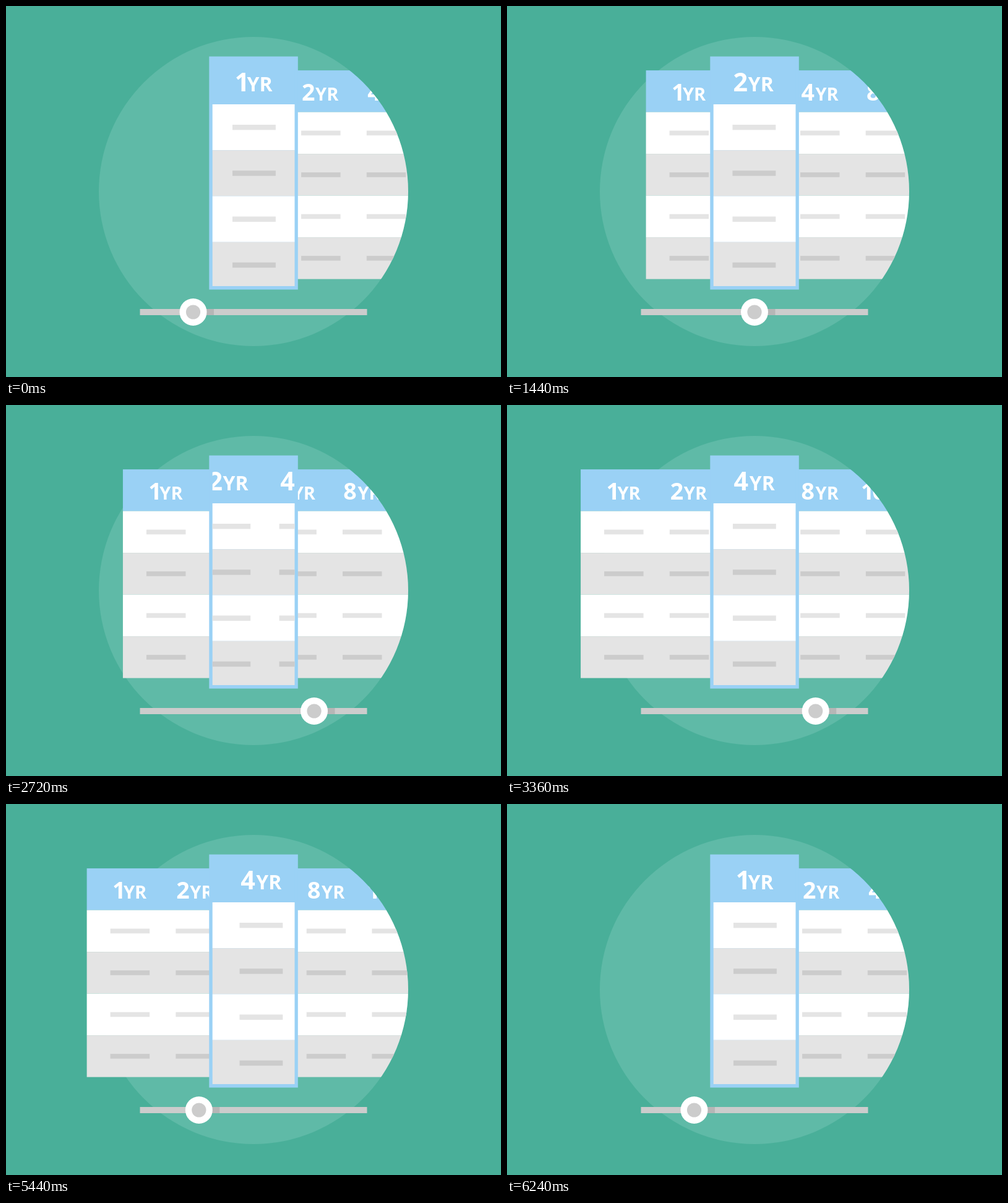
Recreate the animation shown at these times as an HTML page with a canvas. Size 800 by 600 pixels, loop 7680 ms.

```html
<!DOCTYPE html>
<html lang="en">
<head>
<meta charset="utf-8">
<title>Table with zoom slider</title>
<style>
  html, body { margin: 0; width: 100%; height: 100%; overflow: hidden; background: #49af99; }
  canvas { display: block; }
</style>
</head>
<body>
<canvas id="stage" width="800" height="600"></canvas>
<script>
const ctx = document.getElementById('stage').getContext('2d');
const LOOP = 7680;
const BLUE = '#9ad1f5', GREY = '#e4e4e4', DARK = '#ccc';
const COLUMN = 105.7, ROW = 67.5;

// label, x of the digits and x of "YR" inside the column
const LABELS = [['1', 41.4, 59.4], ['2', 39, 61], ['4', 39.5, 62.4], ['8', 39.3, 62.4], ['10', 30, 70]];

// resting positions for the three stops
const KNOB = [302.5, 400, 498.7];
const TABLE = [333.4, 224.6, 119.1];
const LENS = [324.2, 206.4, 90.6];

const MOVES = [
  { start: 0, from: 0, to: 1 },
  { start: 1920, from: 1, to: 2 },
  { start: 4800, from: 2, to: 0 }
];

// cubic-bezier(.73, 0, .03, 1)
function ease(x) {
  if (x <= 0) return 0;
  if (x >= 1) return 1;
  let low = 0, high = 1, s;
  for (let i = 0; i < 24; i++) {
    s = (low + high) / 2;
    const r = 1 - s;
    if (3 * r * r * s * 0.73 + 3 * r * s * s * 0.03 + s * s * s < x) low = s;
    else high = s;
  }
  return s * s * (3 - 2 * s);
}

function rect(color, x, y, w, h) {
  ctx.fillStyle = color;
  ctx.fillRect(x, y, w, h);
}

function disc(color, x, y, r) {
  ctx.fillStyle = color;
  ctx.beginPath();
  ctx.arc(x, y, r, 0, Math.PI * 2);
  ctx.fill();
}

function text(string, size, x, spacing) {
  ctx.font = `700 ${size}px "Open Sans", sans-serif`;
  ctx.letterSpacing = spacing + 'px';
  ctx.fillText(string, x, -19);
}

// The origin is the left end of the line under the header.
function drawTable() {
  rect(BLUE, 0, -ROW, 700, ROW);
  for (let row = 0; row < 4; row++) {
    const shaded = row % 2;
    rect(shaded ? GREY : '#fff', 0, row * ROW, 700, ROW);
    LABELS.forEach((_, i) =>
      rect(shaded ? DARK : GREY, i * COLUMN + 38, row * ROW + 30, 63.5, 7.7));
  }
  ctx.fillStyle = '#fff';
  LABELS.forEach(([digits, digitX, unitX], i) => {
    text(digits, 37.5, i * COLUMN + digitX, -3);
    text('YR', 29, i * COLUMN + unitX, 0);
  });
}

function drawClipped(x, y, scale, clip) {
  ctx.save();
  ctx.beginPath();
  clip();
  ctx.clip();
  ctx.translate(x, y);
  ctx.scale(scale, scale);
  drawTable();
  ctx.restore();
}

function draw(time) {
  const move = MOVES.filter(m => m.start <= time).pop();
  const local = time - move.start;
  const slide = ease(local / 920);
  const scroll = ease((local - 400) / 1040);
  const at = (stops, p) => stops[move.from] + (stops[move.to] - stops[move.from]) * p;

  rect('#49af99', 0, 0, 800, 600);
  disc('#5fbaa7', 400, 300, 250);

  // the round stage cuts off the right side only
  drawClipped(at(TABLE, scroll), 171.6, 1, () => {
    ctx.rect(0, 0, 400, 600);
    ctx.moveTo(400, 50);
    ctx.arc(400, 300, 250, -Math.PI / 2, Math.PI / 2);
  });

  rect(BLUE, 328.3, 81.6, 143.5, 377);
  drawClipped(at(LENS, scroll), 159, 1.1, () => ctx.rect(333.7, 87, 132.8, 366));

  const knob = at(KNOB, slide);
  rect(DARK, 216.5, 490, 367, 10);
  rect('#b6b6b6', knob, 490, 33.5, 10);
  disc('#fff', knob, 495, 22);
  disc(DARK, knob, 495, 11.6);
}

function tick() {
  draw(performance.now() % LOOP);
  requestAnimationFrame(tick);
}
tick();
</script>
</body>
</html>
```
